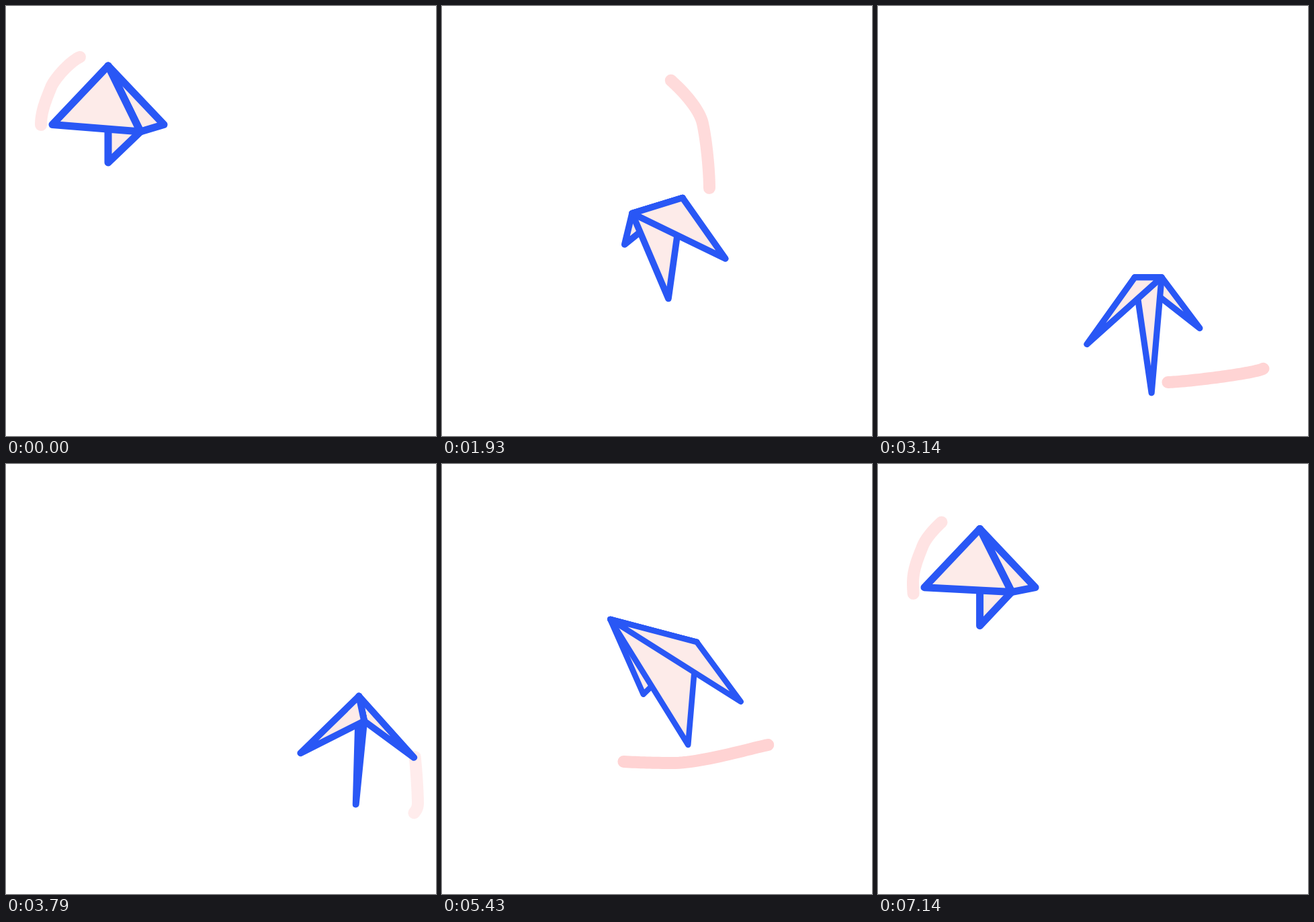
These frames come from a looping animation (640 px wide and 640 px high, 7210 ms). An HTML page:

```html
<!DOCTYPE html>
<html lang="en">
<head>
<meta charset="utf-8">
<title>Paper plane</title>
<style>
  html, body { margin: 0; width: 100%; height: 100%; overflow: hidden; background: #fff; }
  svg { display: block; width: 100vw; height: 100vh; }
  path { stroke-linecap: round; stroke-linejoin: round; }
  #trail { fill: none; stroke: #ffd3d3; stroke-width: 18; }
  #plane { fill: #fdebe9; stroke: #2957f5; }
</style>
</head>
<body>
<svg viewBox="0 0 640 640">
  <path id="trail"/>
  <g id="plane"><path/><path/><path/></g>
</svg>
<script>
const LOOP = 7210, FPS = 14;
const trail = document.getElementById('trail');
const plane = document.getElementById('plane');
const mod = (a, n) => ((a % n) + n) % n;

// Looping monotone cubic through keys of [time, ...values]
function track(keys) {
  const n = keys.length;
  const key = i => {
    const [t, ...values] = keys[mod(i, n)];
    return [t + Math.floor(i / n) * LOOP, ...values];
  };
  const slope = (a, b, j) => (b[j] - a[j]) / (b[0] - a[0]);
  const tangent = (s, r) => s * r > 0 ? 2 * s * r / (s + r) : 0;
  return time => {
    const t = mod(time, LOOP);
    let i = n - 1;
    while (i >= 0 && keys[i][0] > t) i--;
    const [a, b, c, d] = [i - 1, i, i + 1, i + 2].map(key);
    const h = c[0] - b[0], x = (t - b[0]) / h, y = 1 - x;
    return b.slice(1).map((_, k) => {
      const j = k + 1, s = slope(b, c, j);
      const m0 = tangent(slope(a, b, j), s), m1 = tangent(s, slope(c, d, j));
      return b[j] * (1 + 2 * x) * y * y + c[j] * (3 - 2 * x) * x * x
        + h * x * y * (m0 * y - m1 * x);
    });
  };
}

// Top of the tail
const flight = track([
  [0, 152, 89], [790, 280, 47], [1070, 335, 66], [1570, 380, 190],
  [1930, 358, 286], [2290, 360, 458], [3140, 382, 404], [3930, 538, 331],
  [4430, 536, 275], [5430, 379, 265], [6290, 149, 266]
]);

// Attitude, as vectors from the tail: nose, keel, half wingspan
const attitude = track([
  [0, 48, 98, 0, 144, 83, 0],
  [1070, -35, 144, -49, 139, 89.5, 31],
  [1930, -75, 23, -21, 150, 75, 10.5],
  [3140, 40, 0, 25, 172, 84, -12],
  [4430, -48, 74, -34, 150, 84.5, 18.5],
  [5430, -129, -34, -13, 153, 72.5, 5.5]
]);

// Where the back end of the trail is
const wake = track([
  [0, 52, 177], [250, 67, 121], [425, 110, 76], [1070, 250, 38],
  [1930, 341, 111], [2060, 388, 175], [2181, 398, 272], [2400, 375, 400],
  [2700, 385, 545], [3140, 431, 560], [3496, 573, 540], [3930, 613, 505],
  [4500, 600, 395], [5430, 485, 418], [5780, 345, 445], [6030, 270, 443],
  [6700, 80, 300]
]);
// How many ms the front end runs ahead of the back
const lead = t => 425 - 175 * Math.sin(2 * Math.PI * t / LOOP);

const glow = track([[1070, 0], [2250, 1], [3000, 1], [4430, 0], [5430, 1], [6340, 1]]);

const line = points => 'M' + points.map(p => p.map(v => v.toFixed(2)).join()).join('L');

function drawTrail(t) {
  const steps = 40;
  const points = Array.from({ length: steps + 1 }, (_, i) => wake(t + lead(t) * i / steps));
  trail.setAttribute('d', line(points));
  trail.setAttribute('opacity', glow(t)[0].toFixed(3));
}

function drawPlane(t) {
  const [x, y] = flight(t);
  const [nx, ny, kx, ky, wx, wy] = attitude(t);
  // The more the nose tilts, the lower the wings hang along the keel edge
  const hang = .51 + .001 * Math.abs(ny);
  const mx = x + hang * kx, my = y + hang * ky;
  const tail = [x, y], nose = [x + nx, y + ny], keel = [x + kx, y + ky];
  const left = [mx - wx, my - wy], right = [mx + wx, my + wy];
  // The wing on the far side of the keel goes first
  const order = nx * ky > ny * kx ? [right, keel, left] : [left, keel, right];
  order.forEach((tip, i) =>
    plane.children[i].setAttribute('d', line([tail, nose, tip]) + 'Z'));
  plane.setAttribute('stroke-width', (9.2 + .019 * ny).toFixed(2));
}

const start = performance.now();
function tick() {
  const now = mod(performance.now() - start, LOOP);
  const t = Math.floor(now * FPS / 1000 + .08) * 1000 / FPS;
  drawTrail(t);
  drawPlane(t);
  requestAnimationFrame(tick);
}
tick();
</script>
</body>
</html>
```
